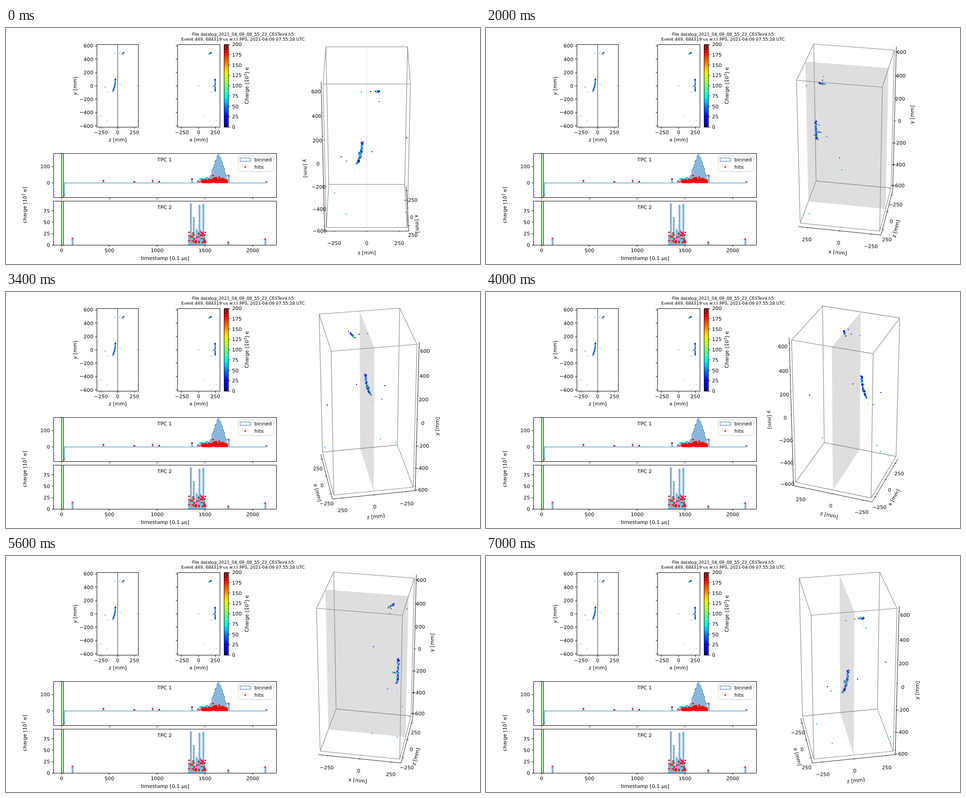
These frames come from a looping animation (1040 by 520 pixels, 7.2 s). An HTML page with a canvas:

```html
<!DOCTYPE html>
<html lang="en">
<head>
<meta charset="utf-8">
<title>Event display</title>
<style>
html, body { margin: 0; width: 100%; height: 100%; overflow: hidden; background: #fff; }
canvas { display: block; width: 1040px; height: 520px; }
</style>
</head>
<body>
<canvas id="stage" width="1040" height="520"></canvas>
<script>
const g = document.getElementById('stage').getContext('2d');
const STEP_MS = 200, STEPS = 36;
const FONT = 11.11, SMALL = 9.3, BLUE = '#1f77b4', RED = '#f00';

let seed = 7;
const rnd = () => (seed = (seed * 16807) % 2147483647) / 2147483647;
const spread = w => (rnd() + rnd() - 1) * w;
const repeat = (n, make) => Array.from({ length: n }, (_, i) => make(i));

// rainbow scale: every channel is a clipped ramp up and down
const ramp = (v, up, upRate, down, downRate) =>
  Math.round(255 * Math.max(0, Math.min(1, (v - up) * upRate, (down - v) * downRate)));
const jet = v => `rgb(${ramp(v, .35, 3.2, 1.11, 4.54)},${ramp(v, .125, 4, .91, 3.7)},${ramp(v, -.11, 4.54, .65, 3.2)})`;

// ---- hits in mm, charge in 10^3 e
const hits = [];
const hit = (z, x, y, charge) => hits.push({ z, x, y, color: jet(Math.min(1, charge / 200)) });
const charge = () => 12 + 100 * rnd() ** 1.7;
[
  [-40, 182, 487, 52], [28, 177, 490, 20], [90, 288, 467, 40], [87, 213, 452, 105],
  [38, 245, 20, 25], [-190, 254, -18, 25], [-153, 186, -98, 45], [-92, 247, -140, 108],
  [-250, 85, -450, 58], [-160, 267, -522, 58], [300, 240, -530, 58], [305, 0, 0, 14]
].forEach(h => hit(...h));
repeat(110, () => {
  const t = rnd();
  hit(-32 - 18 * t - 24 * t ** 3 + spread(9), 247 + spread(9), 103 - 190 * t, charge());
});
repeat(7, i => hit(-58 + spread(8), 212 + 5 * i, -6 + spread(7), charge()));
repeat(28, () => {
  const t = rnd();
  hit(66 + 28 * t + spread(6), 153 + 36 * t + spread(7), 480 + 20 * t + spread(10),
    rnd() < .3 ? 190 * rnd() : charge());
});

// ---- drawing helpers
const crisp = v => Math.floor(v) + .5;
function line(pts, color = '#000', width = 1, close = false) {
  const level = pts.length === 2 && Math.abs(pts[0][1] - pts[1][1]) < .01;
  g.beginPath();
  pts.forEach(([x, y]) => g.lineTo(x, level ? crisp(y) : y));
  if (close) g.closePath();
  g.strokeStyle = color;
  g.lineWidth = width;
  g.stroke();
}
function dot(x, y, r, color) {
  g.fillStyle = color;
  g.beginPath();
  g.arc(x, y, r, 0, 7);
  g.fill();
}
function setFont(size) {
  g.font = size + 'px "DejaVu Sans", sans-serif';
}
function text(s, x, y, align = 'center', size = FONT) {
  setFont(size);
  g.textAlign = align;
  g.fillStyle = '#000';
  g.fillText(s, x, y);
}
function turned(x, y, angle, draw) {
  g.save();
  g.translate(x, y);
  g.rotate(angle);
  draw();
  g.restore();
}
function withPower(before, after) {
  const parts = [[before, FONT, 0], ['3', FONT * .7, -4.2], [after, FONT, 0]];
  const widths = parts.map(([s, size]) => {
    setFont(size);
    return g.measureText(s).width;
  });
  let x = -(widths[0] + widths[1] + widths[2]) / 2;
  parts.forEach(([s, size, dy], i) => {
    text(s, x, dy, 'left', size);
    x += widths[i];
  });
}
const num = v => String(v).replace('-', '\u2212');
function frame(x, y, w, h, color = '#000') {
  g.strokeStyle = color;
  g.lineWidth = 1;
  g.strokeRect(x, y, w, h);
}
function xTicks(vals, at, y) {
  for (const v of vals) {
    line([[crisp(at(v)), y], [crisp(at(v)), y + 4]]);
    text(num(v), at(v), y + 15.2);
  }
}
function yTicks(vals, at, x, labels = true) {
  for (const v of vals) {
    line([[x, at(v)], [x - 4, at(v)]]);
    if (labels) text(num(v), x - 8, Math.round(at(v) + 4), 'right');
  }
}

// ---- flat projections
const MM = .1468;
const HEIGHTS = repeat(7, i => 200 * i - 600), DEPTHS = [-250, 0, 250];
const flatY = v => 127.5 - v * MM;
function flat(key, left, width, mid) {
  const at = v => mid + v * MM;
  for (const h of hits) dot(at(h[key]), flatY(h.y), .8, h.color);
  if (key === 'z') line([[245, 36], [245, 218]], '#808080', 1.67);
  frame(left, 36.5, width, 182);
  xTicks(DEPTHS, at, 218.5);
  yTicks(HEIGHTS, flatY, left, key === 'z');
  text(key + ' [mm]', mid, 250);
}
function colorbar() {
  const fill = g.createLinearGradient(0, 218, 0, 36);
  for (let i = 0; i <= 40; i++) fill.addColorStop(i / 40, jet(i / 40));
  g.fillStyle = fill;
  g.fillRect(478.5, 36.5, 9.5, 182);
  frame(478.5, 36.5, 9.5, 182);
  for (let v = 0; v <= 200; v += 25) {
    const y = 218 - v * .91;
    line([[488, y], [492, y]]);
    text(v, 496, Math.round(y + 4), 'left');
  }
  turned(532, 127, -Math.PI / 2, () => withPower('Charge [10', '] e'));
}

// ---- charge over time; bars are [x, height] in px above the base line
const timeX = v => 122 + v * .2097, TIMES = repeat(5, i => 500 * i);
const BIN = 2.1;
const bars = (x, n, height) => repeat(n, i => [x + i * BIN, height(x + i * BIN, i)]);

const single1 = [[126.4, -28], [213, 5], [281, 3], [321, 5], [335.5, 3], [407.5, 9], [421, 4], [487.5, 17]];
const bump = x => Math.exp(-(((x - 465.5) / 12.5) ** 2));
const bars1 = bars(425, 28, x => 7 + 6 * rnd() + 50 * bump(x));
const cloud1 = repeat(160, () => {
  const x = 429 + 56 * rnd();
  return [x, 1 + (6 + 7 * bump(x)) * rnd() ** 1.3];
});
const single2 = [[145, 15], [487, 6.5], [568, 13]];
const spikes = { 2: 91, 5: 61, 11: 88, 15: 90 };
const bars2 = bars(400.4, 18, (x, i) => spikes[i] || 10 + 25 * rnd());
const cloud2 = repeat(40, () => [401 + 37 * rnd(), 6 + 36 * rnd() ** 2]);

function timePanel(top, name, base, singles, cluster, cloud) {
  g.fillStyle = '#fff';
  g.fillRect(104.5, top, 489, 97);
  const pts = [];
  for (const [x, h] of [...singles, ...cluster].sort((a, b) => a[0] - b[0]))
    pts.push([x, base], [x, base - h], [x + BIN, base - h], [x + BIN, base]);
  line([...pts, [570, base]], BLUE, 1.1);
  for (const [x, h] of [...singles, ...cloud]) dot(x + .5, base - Math.min(h, 8 + h / 2), 1.85, RED);
  for (const x of [122, 126]) line([[x, top], [x, top + 97]], '#008000', 1.67);
  frame(104.5, top, 489, 97);
  text(name, 332, top + 17, 'left');
}
function legend() {
  g.beginPath();
  g.roundRect(509.5, 281.5, 78, 35, 2.5);
  g.fillStyle = 'rgba(255,255,255,.8)';
  g.fill();
  g.strokeStyle = '#ccc';
  g.lineWidth = 1;
  g.stroke();
  frame(513.5, 286.5, 23, 7, BLUE);
  dot(525, 306.3, 1.85, RED);
  text('binned', 545, 294, 'left');
  text('hits', 545, 310, 'left');
}
function timePanels() {
  timePanel(276.5, 'TPC 1', 341.5, single1, bars1, [...cloud1, [454, 17], [571, 2]]);
  yTicks([0, 100], v => 341.3 - v * .36, 104.5);
  xTicks(TIMES, timeX, 373.5);
  legend();
  timePanel(381.5, 'TPC 2', 478.5, single2, bars2, cloud2);
  yTicks([0, 25, 50, 75], v => 478.3 - v * 1.008, 104.5);
  xTicks(TIMES, timeX, 478.5);
  text('timestamp [0.1 \u00b5s]', 349, 511);
  turned(45, 390, -Math.PI / 2, () => withPower('charge [10', ' e]'));
}

// ---- rotating view; coordinates are [x, z, y]
const HALF = [310, 310, 620], WORLD = .74687 / 620, DIST = 10, ZOOM = 2387;
const SE = .5, CE = Math.sqrt(3) / 2;
const AXES = [
  { name: 'x [mm]', ticks: DEPTHS, pad: .1242 },
  { name: 'z [mm]', ticks: DEPTHS, pad: .1242 },
  { name: 'y [mm]', ticks: HEIGHTS, pad: .2037 }
];
function space(azim) {
  const c = Math.cos(azim), s = Math.sin(azim);
  const proj = ([x, z, y]) => {
    const u = (c * z - s * x) * WORLD, f = (c * x + s * z) * WORLD, h = y * WORLD;
    const k = ZOOM / (DIST - f * CE - h * SE);
    return [791.5 + u * k, 241.5 - (h * CE - f * SE) * k];
  };
  const far = [c < -1e-9 ? 1 : -1, s < -1e-9 ? 1 : -1, -1];

  AXES.forEach(({ name, ticks, pad }, i) => {
    const side = i === 0 ? 1 : 0;
    const sign = far.slice();
    sign[side] *= -1;
    // point on the axis at v, pushed outwards by a share of the full range
    const spot = (v, push) => HALF.map((h, j) => j === i ? v : sign[j] * h * (25 / 24 + 2 * push));
    const end = HALF[i] * 25 / 24;
    const a = proj(spot(-end, 0)), b = proj(spot(end, 0));
    line([a, b], '#000', .9);
    for (const v of ticks) {
      const mark = d => {
        const p = spot(v, 0);
        p[side] += sign[side] * d * HALF[side] / 6;
        return proj(p);
      };
      line([mark(-.1), mark(.2)], '#000', .9);
      const p = proj(spot(v, .0571));
      text(num(v), p[0], Math.round(p[1] + 8.2));
    }
    let angle = Math.atan2(b[1] - a[1], b[0] - a[0]);
    if (angle >= Math.PI / 2) angle -= Math.PI;
    if (angle < -Math.PI / 2) angle += Math.PI;
    turned(...proj(spot(0, pad)), angle, () => text(name, 0, 2.9));
  });

  for (const h of hits) dot(...proj([h.x, h.z, h.y]), 1.25, h.color);

  const plane = [[-1, -1], [1, -1], [1, 1], [-1, 1]].map(([x, y]) => proj([310 * x, 0, 620 * y]));
  const shade = 'rgba(128,128,128,.26)';
  g.beginPath();
  plane.forEach(p => g.lineTo(...p));
  g.fillStyle = shade;
  g.fill();
  if (Math.abs(s) < 1e-9) line(plane, shade, 1.1, true);

  const corner = n => proj(HALF.map((h, j) => n >> j & 1 ? h : -h));
  for (let n = 0; n < 8; n++)
    for (let j = 0; j < 3; j++)
      if (!(n >> j & 1)) line([corner(n), corner(n | 1 << j)], '#808080', 1.1);
}

function draw(step) {
  g.fillStyle = '#fff';
  g.fillRect(0, 0, 1040, 520);
  text('File datalog_2021_04_09_09_55_23_CESTevd.h5', 520, 17, 'center', SMALL);
  text('Event 449, 684319 us w.r.t PPS, 2021-04-09 07:55:28 UTC', 520, 28, 'center', SMALL);
  flat('z', 199.5, 91, 245);
  turned(155, 127.5, -Math.PI / 2, () => text('y [mm]', 0, 0));
  flat('x', 376.5, 93, 422.6);
  colorbar();
  timePanels();
  space(step * 2 * Math.PI / STEPS);
}

let shown = -1;
function tick() {
  const step = Math.floor(performance.now() / STEP_MS) % STEPS;
  if (step !== shown) draw(shown = step);
  requestAnimationFrame(tick);
}
tick();
</script>
</body>
</html>
```
